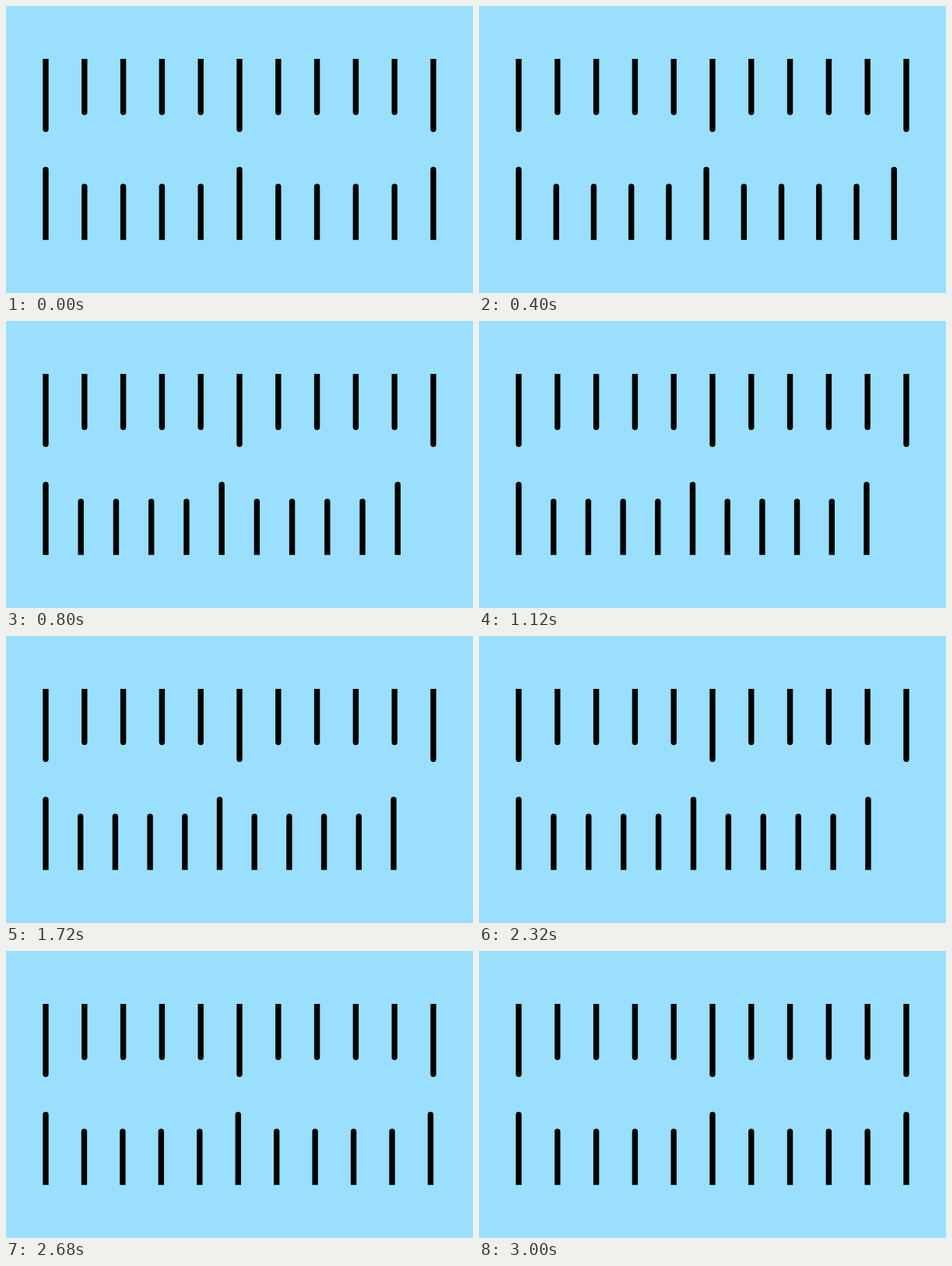
These frames come from a looping animation (600 by 369 pixels, 3.32 s). An HTML page:

```html
<!DOCTYPE html>
<html lang="en">
<head>
<meta charset="utf-8">
<title>Two scales</title>
<style>
  html, body { margin: 0; width: 100%; height: 100%; overflow: hidden; background: #9adffd; }
  svg { display: block; width: 600px; height: 369px; }
</style>
</head>
<body>
<svg id="stage" viewBox="0 0 600 369"></svg>
<script>
  const LOOP = 3320, STEP = 40;
  const LEFT = 51, WIDE = 49.8, NARROW = 44.7, R = 3.7;
  const stage = document.getElementById('stage');

  // A bar that is flat at `base` and round at its tip.
  function addTick(base, tip) {
    const dir = Math.sign(tip - base);
    const path = document.createElementNS('http://www.w3.org/2000/svg', 'path');
    path.setAttribute('d', `M${-R} ${base}V${tip - dir * R}A${R} ${R} 0 0 ${dir > 0 ? 0 : 1} ${R} ${tip - dir * R}V${base}Z`);
    stage.append(path);
    return path;
  }

  function addScale(base, longTip, shortTip) {
    return Array.from({ length: 11 }, (_, i) => addTick(base, i % 5 ? shortTip : longTip));
  }

  function spread(ticks, gap) {
    ticks.forEach((tick, i) => tick.setAttribute('transform', `translate(${LEFT + i * gap} 0)`));
  }

  const clamp = x => Math.min(1, Math.max(0, x));
  const sine = x => (1 - Math.cos(Math.PI * x)) / 2;
  const cubic = x => x < 0.5 ? 4 * x ** 3 : 1 - 4 * (1 - x) ** 3;

  // The scale holds, then snaps into a squeeze already under way.
  function squeeze(t) {
    if (t < 400) return 0;
    if (t < 2000) return sine(clamp((t - 40) / 960));
    return 1 - cubic(clamp((t - 2174) / 682));
  }

  const upper = addScale(68, 162, 140.3);
  const lower = addScale(300.8, 206.7, 228.4);
  spread(upper, WIDE);

  const start = performance.now();
  function draw() {
    const elapsed = Math.max(0, performance.now() - start) % LOOP;
    const t = Math.floor(elapsed / STEP) * STEP;
    spread(lower, WIDE + (NARROW - WIDE) * squeeze(t));
    requestAnimationFrame(draw);
  }
  draw();
</script>
</body>
</html>
```
